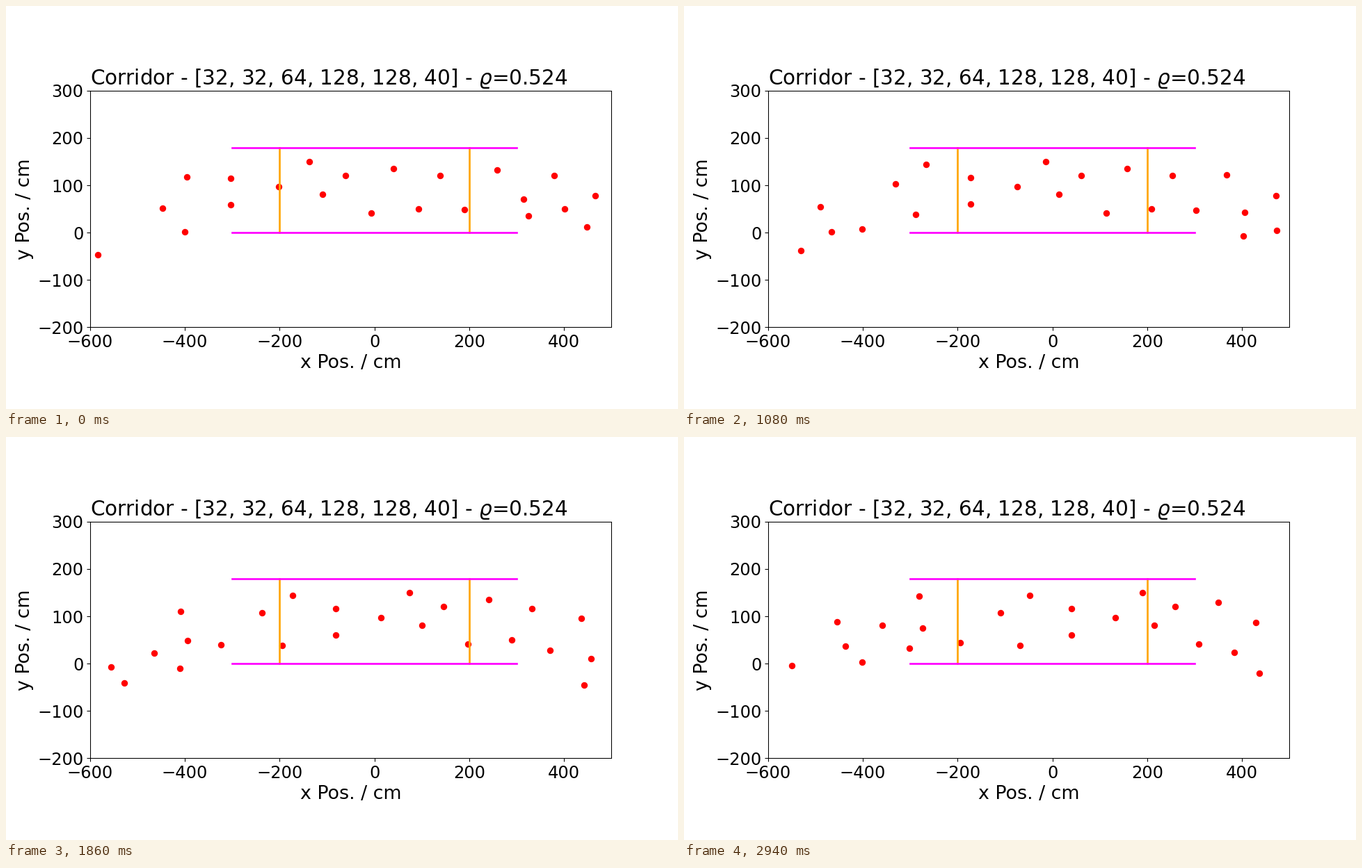
A matplotlib script that plays this animation: 966x580 px, repeating every 3 s.

```python
import numpy as np
import matplotlib.pyplot as plt
from matplotlib.animation import FuncAnimation

FRAMES, INTERVAL = 50, 60
W, H, DPI = 966, 580, 100
PT = 0.966                       # text and line sizes are scaled by this
Y_MIN, X_MAX = -50.5, 505        # limits of the tracked area in cm

# One entry per person: the step at which x = 0 is crossed, and the lane's y in cm
CROSSING = [-78, -77, -66, -60, -51, -49, -40, -29, -21, -14, -6, 1, 9, 16, 20, 29,
            43, 43, 56, 59, 65, 77, 88, 89, 92, 100, 108, 113, 114, 131, 135]
LANE = [69, 131, 76, 134, 40, 72, 132, 48, 120, 50, 136, 42, 120, 81, 150, 97,
        116, 60, 144, 38, 107, 44, 75, 142, 34, 92, 40, 87, 148, 144, 85]

plt.rcParams["font.family"] = "DejaVu Sans"
X = np.arange(-640.0, 541.0)


def path(x, lane):
    """Straight inside the corridor, bending down on both sides of it."""
    low = ((150 - lane) / 110) ** 4
    before = np.maximum(-285 - x, 0)
    after = np.maximum(x - 290, 0)
    return (lane - (0.0021 + 0.0006 * low) * before ** 2
            - (0.0017 + 0.002 * low) * after ** 2)


def travel_time(lane):
    """Steps needed from x = 0 to each X; low lanes are slower outside."""
    outside = np.clip((abs(X) - 280) / 150, 0, 1)
    speed = 6.75 - 0.002 * X - 1.76 * outside * (150 - lane) / 110
    t = np.cumsum(np.hypot(1, np.gradient(path(X, lane))) / speed)
    return t - np.interp(0, X, t)


walkers = [(start, lane, travel_time(lane)) for start, lane in zip(CROSSING, LANE)]


def positions(step):
    found = []
    for start, lane, t in walkers:
        x = np.interp(step - start, t, X)
        y = path(x, lane)
        if y >= Y_MIN and x <= X_MAX:
            found.append((x, y))
    return found


fig = plt.figure(figsize=(W / DPI, H / DPI), dpi=DPI)
ax = fig.add_axes([120.9 / W, 117.55 / H, 749.4 / W, 340.65 / H])
ax.set_xlim(-600, 500)
ax.set_ylim(-200, 300)
ax.set_xticks(range(-600, 401, 200))
ax.set_yticks(range(-200, 301, 100))
ax.tick_params(labelsize=18 * PT, length=3.5 * PT, pad=3.5 * PT, width=0.8 * PT)
ax.spines[:].set_linewidth(0.8 * PT)
ax.set_xlabel("x Pos. / cm", fontsize=20 * PT)
ax.set_ylabel("y Pos. / cm", fontsize=20 * PT)
ax.set_title(r"Corridor - [32, 32, 64, 128, 128, 40] - $\varrho$=0.524",
             loc="left", fontsize=22 * PT)

for x in (-200, 200):
    ax.plot([x, x], [0, 180], color="orange", lw=2 * PT)
for y in (0, 180):
    ax.plot([-300, 300], [y, y], color="magenta", lw=2 * PT)
dots = ax.scatter([], [], s=36 * PT ** 2, color="red", linewidths=PT, zorder=1)


def update(step):
    dots.set_offsets(positions(step))
    return dots,


anim = FuncAnimation(fig, update, frames=FRAMES, interval=INTERVAL, repeat=True)
plt.show()
```
